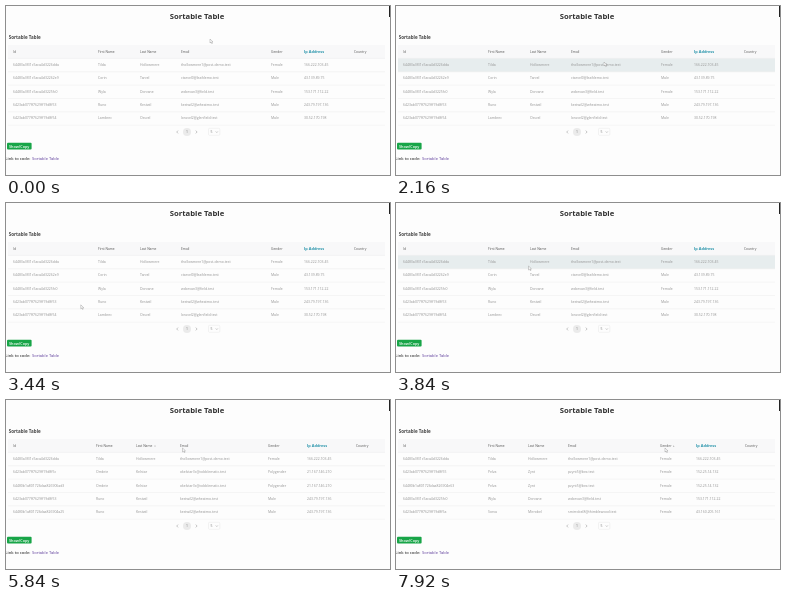
These frames come from a looping animation (384 by 169 pixels, 8 s). An HTML page:

```html
<!DOCTYPE html>
<html lang="en">
<head>
<meta charset="utf-8">
<title>Sortable Table</title>
<style>
  html, body { margin: 0; width: 100%; height: 100%; overflow: hidden; background: #fdfdfd; }
  svg { display: block; width: 100%; height: 100%; }
  text { font-family: "Open Sans", "Noto Sans", sans-serif; font-size: 3.45px; fill: #929292; }
  .title { font-size: 7.7px; font-weight: 650; fill: #333; text-anchor: middle; }
  .subtitle { font-size: 4.5px; font-weight: 650; fill: #444; }
  .head { font-size: 3.3px; fill: #555; }
  .ip { font-size: 3.9px; font-weight: 700; fill: #2593aa; }
  .page { text-anchor: middle; fill: #777; }
  .button { font-size: 3.8px; font-weight: 600; fill: #fff; text-anchor: middle; }
  .note { font-size: 4.1px; font-weight: 600; fill: #444; }
  .link { font-size: 4.1px; fill: #5c3a9a; }
  .rule { stroke: #ebebeb; stroke-width: .5; }
</style>
</head>
<body>
<svg viewBox="0 0 384 169" preserveAspectRatio="none">
  <rect width="384" height="169" fill="#fdfdfd"/>
  <rect x="383" width="1" height="11" fill="#222"/>
  <text class="title" x="191" y="13.4">Sortable Table</text>
  <text class="subtitle" x="2.8" y="32.9">Sortable Table</text>
  <rect x="2" y="39" width="377" height="13.4" fill="#f8f8f9"/>
  <rect id="hover" x="2" y="52.4" width="377" height="13.3" fill="#e7edee"/>
  <g id="rules"></g>
  <g id="table"></g>

  <g fill="none" stroke="#888" stroke-width=".5">
    <path d="M172 124.6l-1.3 1.4 1.3 1.4M189.8 124.6l1.3 1.4-1.3 1.4"/>
    <path d="M209.8 125.5l1 1 1-1"/>
    <rect x="202.5" y="122.3" width="11.3" height="7" rx="1" stroke="#e6e6e6"/>
  </g>
  <circle cx="181" cy="125.9" r="4" fill="#ebebeb"/>
  <text class="page" x="181" y="127.1">1</text>
  <text class="page" x="205.6" y="127.1">5</text>

  <rect x="1" y="136.7" width="24.6" height="6.8" rx="1" fill="#18a548"/>
  <text class="button" x="13.2" y="141.5">Show/Copy</text>
  <text class="note" x="24.4" y="153.6" text-anchor="end">Link to code:</text>
  <text class="link" x="26" y="153.6">Sortable Table</text>

  <path id="cursor" d="M0 0v4l1-.9.7 1.5.7-.3-.7-1.4h1.3z" fill="#fff" stroke="#888" stroke-width=".4"/>
</svg>
<script>
const LOOP = 8000, STEP = 80, ROW = 13.35;
const byId = id => document.getElementById(id);

const idA = "64483a3f31c5aca4d322", idB = "6423ab077ff7629ff19d8f", idC = "64480b1a801726daa82690";
const kestwil = ["Runo", "Kestwil", "kestwil2@wheatmo.test", "Male", "243.79.197.136"];
const kelstar = ["Ombrie", "Kelstar", "okelstar3c@cobblematic.test", "Polygender", "21.167.146.210"];
const zynt = ["Pelva", "Zynt", "pzynt5@bex.test", "Female", "152.25.14.132"];
const people = [
  [idA + "6dda", "Tilda", "Hollowmere", "thollowmere1@post-demo.test", "Female", "166.222.103.45"],
  [idA + "62e9", "Corin", "Tarvel", "ctarvel0@leafdemo.test", "Male", "43.139.89.75"],
  [idA + "5fc0", "Wyla", "Dorvane", "wdorvan3@field.test", "Female", "153.171.112.22"],
  [idB + "53", ...kestwil],
  [idB + "54", "Lambrec", "Ossvel", "lossvel2@glenfield.test", "Male", "30.52.170.198"],
  [idB + "5c", ...kelstar],
  [idC + "6ad3", ...kelstar],
  [idC + "4a25", ...kestwil],
  [idB + "55", ...zynt],
  [idC + "4e63", ...zynt],
  [idB + "5a", "Sorva", "Mirrobel", "smirrobel8@thimblewood.test", "Female", "43.160.205.161"]
];

const heads = ["Id", "First Name", "Last Name", "Email", "Gender", "Ip Address", "Country"];
const plain = [7, 92, 134, 175, 265, 298, 348];
const byLast = [7, 90, 130, 174, 262, 301, 350];
const byGender = [7, 92, 132, 172, 264, 300, 349];
const views = [
  { from: 0, cols: plain, order: [0, 1, 2, 3, 4] },
  { from: 4960, cols: byLast, order: [2, 8, 9, 3, 7], sorted: 2, up: true },
  { from: 5440, cols: byLast, order: [0, 5, 6, 3, 7], sorted: 2 },
  { from: 6160, cols: byLast, order: [1, 2, 8, 9, 3], sorted: 3, up: true },
  { from: 6640, cols: byLast, order: [0, 5, 6, 10, 4], sorted: 3 },
  { from: 7440, cols: byGender, order: [0, 8, 9, 2, 10], sorted: 4, up: true }
];
const arrowX = { 2: 148.3, 3: 183.5, 4: 277 };

const label = (x, y, value, kind = "") => `<text class="${kind}" x="${x}" y="${y}">${value}</text>`;

function tableMarkup({ cols, order, sorted, up }) {
  const header = heads.map((name, i) => label(cols[i], 47.3, name, i === 5 ? "ip" : "head"));
  const rows = order.flatMap((person, r) =>
    people[person].map((value, i) => label(cols[i], 60 + r * ROW, value)));
  const arrow = sorted
    ? `<path d="M${arrowX[sorted]} ${up ? 46.6 : 45.8}h1.4l-.7 ${up ? -1 : 1}z" fill="#777"/>` : "";
  return header.join("") + rows.join("") + arrow;
}

byId("rules").innerHTML = Array.from({ length: 6 }, (_, i) =>
  `<path class="rule" d="M2 ${52.4 + i * ROW}h377"/>`).join("");

// Pointer stops: time, x, y
const stops = [
  [0, 204, 33], [560, 211, 40], [1600, 214, 47], [1920, 211, 50], [2160, 208, 56],
  [2640, 140, 64], [2960, 65, 90], [3200, 57.5, 101], [3520, 78, 102], [3840, 132.5, 63],
  [4160, 142, 54], [4560, 147, 47.5], [5440, 147, 47.5], [5840, 176.5, 48],
  [6640, 177, 48], [7280, 269, 48], [8000, 269, 48]
];
const hovers = [[2000, 2720], [3680, 4240]];

function pointerAt(t) {
  const i = stops.findIndex(stop => stop[0] > t);
  const [t0, x0, y0] = stops[i - 1], [t1, x1, y1] = stops[i];
  const p = (t - t0) / (t1 - t0), ease = p * p * (3 - 2 * p);
  return [x0 + (x1 - x0) * ease, y0 + (y1 - y0) * ease];
}

let shown;
function draw() {
  const t = Math.floor(performance.now() % LOOP / STEP) * STEP;
  const view = views.findLast(v => v.from <= t);
  if (view !== shown) byId("table").innerHTML = tableMarkup(shown = view);
  byId("hover").style.display = hovers.some(([a, b]) => t >= a && t < b) ? "" : "none";
  byId("cursor").setAttribute("transform", `translate(${pointerAt(t)})`);
  requestAnimationFrame(draw);
}
draw();
</script>
</body>
</html>
```
